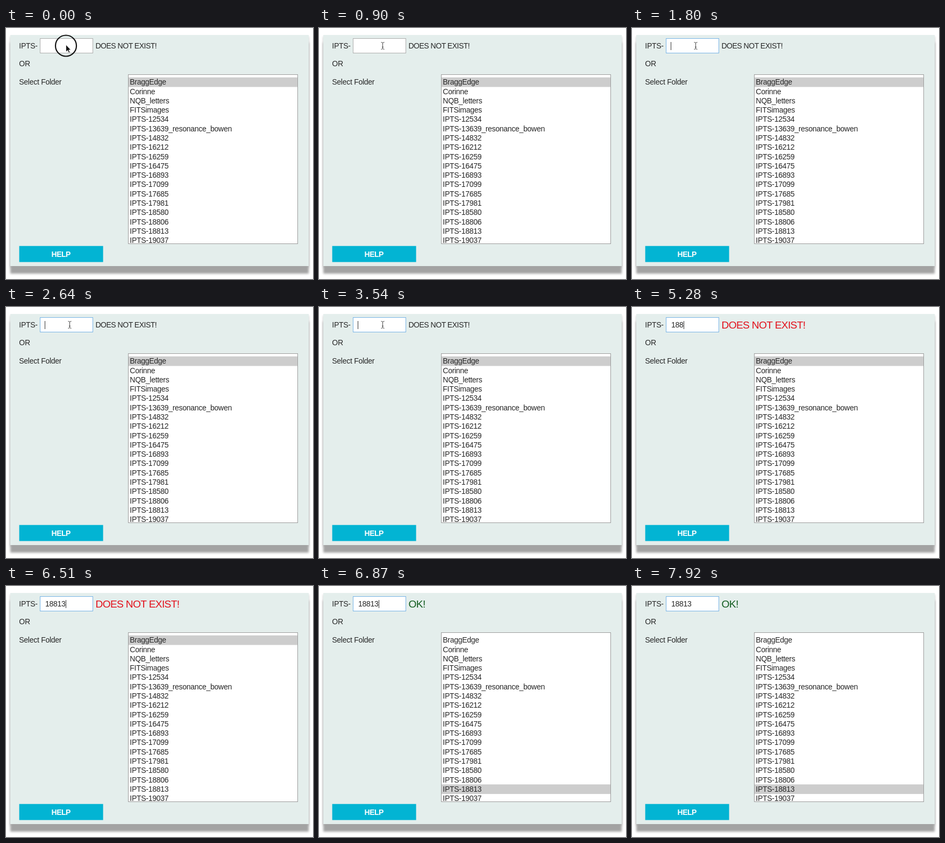
These frames come from a looping animation (571 by 466 pixels, 8000 ms). An HTML page:

```html
<!DOCTYPE html>
<html lang="en">
<head>
<meta charset="utf-8">
<title>Folder selection</title>
<style>
  html, body { margin: 0; width: 100%; height: 100%; overflow: hidden; background: #fff; }
  .panel {
    position: absolute; left: 8px; top: 13px; width: 555px; height: 429px;
    background: #e4eeec; box-shadow: 0 14px 4px #a3a3a3, 0 3px 4px #c4c4c4;
  }
  svg { position: absolute; left: 0; top: 0; display: block; }
  text {
    font: 14px "Liberation Sans", Arial, sans-serif; letter-spacing: -.02em;
    fill: #262626; white-space: pre;
  }
  #status { letter-spacing: -.035em; }
  #status.bad { font-size: 19.2px; fill: #e3101b; }
  #status.ok { font-size: 19.2px; fill: #0f5a1c; }
  #field { fill: #fff; stroke: #adadad; }
  #field.focus { stroke: #78b4e6; }
  .help { font-weight: bold; letter-spacing: -.035em; fill: #fff; text-anchor: middle; }
</style>
</head>
<body>
<div class="panel"></div>
<svg width="571" height="466" viewBox="0 0 571 466">
  <text x="24.3" y="38">IPTS-</text>
  <rect id="field" x="63.5" y="19.5" width="98" height="27"/>
  <text id="typed" x="73" y="38"></text>
  <path id="caret" d="M0 26V41" stroke="#333"/>
  <text id="status" x="166.5" y="38"></text>
  <text x="24.3" y="71.2">OR</text>
  <text x="24.3" y="105">Select Folder</text>

  <rect x="227.5" y="86.5" width="315" height="314" fill="#fff" stroke="#9c9c9c"/>
  <rect id="selection" x="228" width="314" height="17.8" fill="#cdcdcd"/>
  <g id="list"></g>

  <rect x="24.6" y="404.7" width="156" height="29.8" fill="#02b4d3"/>
  <text class="help" x="102.3" y="425">HELP</text>

  <g id="pointer">
    <circle id="ring" cx="0" cy="0" r="19.5" fill="none" stroke="#111" stroke-width="2.2"/>
    <path id="arrow" d="M0-2V11.5L3.2 8.6L5.4 13.2L7.5 12.2L5.4 7.8H9.2Z" fill="#111" stroke="#fff" stroke-width=".8"/>
    <path id="beam" d="M-3-6.5Q0-6.5 0-4.5Q0-6.5 3-6.5M0-4.5V4.5M-3 6.5Q0 6.5 0 4.5Q0 6.5 3 6.5M-1.5 2.5H1.5" fill="none" stroke="#444"/>
  </g>
</svg>
<script>
const LOOP = 8000, FOCUS = 1440, MATCH = 6570, BLINK = 500;
const ROW = 17.29;
const CODE = "18813";
const keyTimes = [4080, 4620, 5130, 5820, 6390];
const folders = ["BraggEdge", "Corinne", "NQB_letters", "FITSimages", "IPTS-12534",
  "IPTS-13639_resonance_bowen",
  ..."14832 16212 16259 16475 16893 17099 17685 17981 18580 18806 18813 19037"
    .split(" ").map(id => "IPTS-" + id)];

const $ = id => document.getElementById(id);
const show = (id, on) => $(id).setAttribute("visibility", on ? "visible" : "hidden");

folders.forEach((name, i) => {
  const row = document.createElementNS("http://www.w3.org/2000/svg", "text");
  row.setAttribute("x", 230.3);
  row.setAttribute("y", 105.3 + i * ROW);
  row.textContent = name;
  $("list").append(row);
});

function drawPointer(t) {
  const p = Math.min(t / 450, 1);
  const x = 111.5 + 7 * p * p * (3 - 2 * p);
  $("pointer").setAttribute("transform", `translate(${x} 33)`);
  show("ring", t < 180);
  show("arrow", t < 210);
  show("beam", t >= 210 && t < keyTimes[0]);
}

function drawField(t) {
  const count = keyTimes.filter(k => t >= k).length;
  $("typed").textContent = CODE.slice(0, count);
  $("field").setAttribute("class", t >= FOCUS ? "focus" : "");

  const since = t - (count ? keyTimes[count - 1] : FOCUS);
  const done = count === CODE.length && since > BLINK;
  show("caret", since >= 0 && since % (2 * BLINK) < BLINK && !done);
  const caretX = count ? Math.round(73 + count * 7.51) + 0.5 : 72.5;
  $("caret").setAttribute("transform", `translate(${caretX} 0)`);
}

function drawResult(t) {
  const matched = t >= MATCH;
  const checked = t >= keyTimes[0] + 90;
  const status = $("status");
  status.textContent = matched ? "OK!" : "DOES NOT EXIST!";
  status.setAttribute("class", matched ? "ok" : checked ? "bad" : "");
  status.setAttribute("y", checked ? 40 : 38);
  const index = matched ? folders.indexOf("IPTS-" + CODE) : 0;
  $("selection").setAttribute("y", 91.7 + index * ROW);
}

const start = performance.now();
function frame() {
  const t = (performance.now() - start) % LOOP;
  drawPointer(t);
  drawField(t);
  drawResult(t);
  requestAnimationFrame(frame);
}
frame();
</script>
</body>
</html>
```
